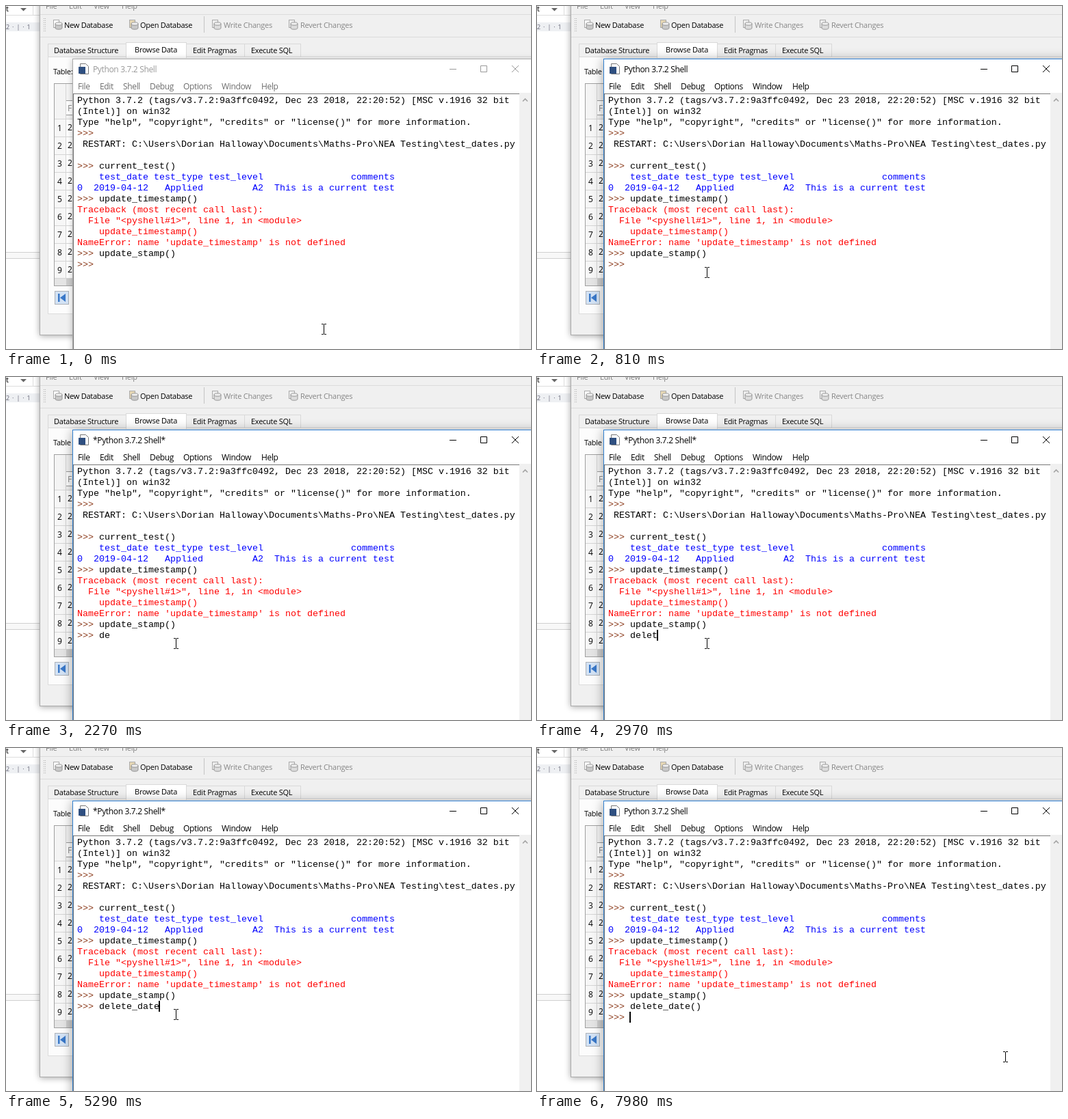
An HTML page for the animation above (8000 ms loop, 767 px wide and 502 px high).

```html
<!DOCTYPE html>
<html lang="en">
<head>
<meta charset="utf-8">
<title>Shell over database browser</title>
<style>
html, body { margin: 0; width: 100%; height: 100%; overflow: hidden; background: #fff; }
svg { display: block; }
text { white-space: pre; font: 11px "Open Sans", "Noto Sans", sans-serif; letter-spacing: -.25px; }
.num { font-size: 12px; }
.off { fill: #868686; }
#code text { font: 13.333px "Liberation Mono", monospace; letter-spacing: 0; }
#shell text.ui { font-size: 12px; letter-spacing: -.35px; }
#frame { fill: #fff; stroke: #aaa; filter: drop-shadow(0 1px 4px rgba(0,0,0,.25)); }
.active #frame { stroke: #2f7fd0; filter: drop-shadow(0 2px 8px rgba(0,0,0,.38)); }
#title, #buttons { fill: #999; stroke: none; }
#buttons { fill: none; stroke: #999; }
#menu { fill: #6d6d6d; }
.active #title, .active #menu { fill: #000; }
.active #buttons { stroke: #000; }
</style>
</head>
<body>
<svg width="767" height="502" viewBox="0 0 767 502">
  <!-- document editor -->
  <rect width="767" height="502" fill="#fff"/>
  <text x="0" y="8">t</text>
  <path d="M21 3h9l-4.5 4.5z" fill="#666"/>
  <path d="M39.5 0v13M0 13.5h50" stroke="#ddd"/>
  <rect y="24" width="50" height="13" fill="#eef0f3"/>
  <text x="0" y="34" fill="#667" style="font-size:9px">2  ·  |  ·  1</text>
  <rect y="360" width="50" height="10" fill="#f8f8f8"/>
  <path d="M0 360.5h50M0 369.5h50" stroke="#d0d0d0"/>

  <!-- database window -->
  <rect x="49.5" y="-20.5" width="760" height="502" fill="#f0f0f0" stroke="#aaa"
    style="filter:drop-shadow(0 1px 5px rgba(0,0,0,.35))"/>
  <g id="db"></g>

  <!-- shell window -->
  <g id="shell">
    <rect id="frame" x="97.5" y="77.5" width="720" height="480"/>
    <path d="M108.5 84.5h8l4 4v11h-12z" fill="#fff" stroke="#777"/>
    <rect x="106" y="89" width="10" height="10" fill="#2f4f80"/>
    <text id="title" class="ui" x="127" y="97"></text>
    <path id="buttons" d="M648 92.5h10M693.5 87.5h9v9h-9zM739 87l10 10M749 87l-10 10"/>
    <g id="menu"></g>
    <path d="M98 128.5h652M98.5 128v374" stroke="#777" fill="none"/>
    <rect x="750" y="127" width="17" height="375" fill="#f0f0f0"/>
    <path d="M755 139.5l3.5-3.5l3.5 3.5" fill="none" stroke="#a3a3a3" stroke-width="1.6"/>
    <g id="code"></g>
    <rect id="caret" width="2" height="16"/>
  </g>
  <path id="mouse" d="M-3-7.5h3M1-7.5h3M.5-7v14M-3 7.5h3M1 7.5h3" stroke="#000" fill="none"/>
</svg>
<script>
const $ = id => document.getElementById(id);
const esc = s => s.replace(/</g, "&lt;").replace(/>/g, "&gt;");
const label = (x, y, s, attrs = "") => `<text x="${x}" y="${y}" ${attrs}>${esc(s)}</text>`;
const box = (x, y, w, h, fill, line) =>
  `<rect x="${x + .5}" y="${y + .5}" width="${w}" height="${h}" fill="${fill}" stroke="${line}"/>`;
const line = (d, c) => `<path d="${d}" stroke="${c}" fill="none"/>`;

// page with a small drum in front of it
const icon = (x, page, drum) => box(x, 20, 8, 11, page, "#aaa") +
  `<path d="M${x + 3} 26v6a5 2.2 0 0 0 10 0v-6z" fill="${drum}" stroke="#777" stroke-width=".7"/>
   <ellipse cx="${x + 8}" cy="26" rx="5" ry="2.2" fill="#eee" stroke="#777" stroke-width=".7"/>`;

function drawDatabase() {
  let s = [[58, "File"], [92, "Edit"], [128, "View"], [169, "Help"]]
    .map(([x, t]) => label(x, 4, t, 'fill="#808080"')).join("");
  s += line("M50 12.5h717M50 45.5h717", "#dcdcdc") + line("M289.5 15v24", "#c4c4c4");
  s += `<path d="M55.5 18v20M57.5 18v20" stroke="#b0b0b0" stroke-dasharray="1 2"/>`;
  s += icon(69, "#fff", "#c9c9c9") + icon(180, "#e8d9b5", "#c9c9c9") +
    icon(301, "#eee", "#ddd") + icon(413, "#eee", "#ddd");
  s += label(85, 32, "New Database") + label(196, 32, "Open Database") +
    label(318, 32, "Write Changes", 'class="off"') + label(430, 32, "Revert Changes", 'class="off"');

  s += box(61, 74, 740, 376, "#fcfcfc", "#dcdcdc");
  for (const [x, w, t] of [[61, 114, "Database Structure"], [263, 85, "Edit Pragmas"], [348, 82, "Execute SQL"]])
    s += box(x, 55, w, 19, "#f0f0f0", "#d9d9d9") + label(x + (x > 61 ? 10 : 9), 69, t);
  s += box(175, 53, 88, 22, "#fff", "#d9d9d9") +
    `<rect x="176" y="74" width="87" height="3" fill="#fcfcfc"/>` + label(188, 68, "Browse Data");

  s += label(69, 100, "Table:", 'id="table"');
  s += box(70, 113, 60, 296, "#fff", "#a0a0a0") +
    `<rect x="71" y="114" width="16" height="285" fill="#f7f7f7"/>
     <rect x="71" y="114" width="40" height="51" fill="#f4f4f4"/>
     <rect x="71" y="399" width="40" height="10" fill="#e4e4e4"/>
     <rect x="88" y="399" width="20" height="10" fill="#cdcdcd"/>`;
  s += box(87, 138, 30, 21, "#fff", "#999") + label(90, 154, "F", 'class="num" fill="#888"');
  for (let i = 0; i < 9; i++) {
    const y = 165 + 26 * i;
    s += line(`M71 ${y}.5h30`, "#d5d5d5") +
      label(75, y + 18, String(i + 1), 'class="num"') + label(90, y + 17, "2", 'class="num"');
  }
  s += line("M71 398.5h30M87.5 114v285", "#d5d5d5");
  s += box(71, 417, 20, 19, "#d3e2f4", "#adb2b8") +
    `<path d="M76 421h2.5v12h-2.5zM87 421v12l-8-6z" fill="#3a78c8"/>`;
  $("db").innerHTML = s;
}

const rows = [
  'Python 3.7.2 (tags/v3.7.2:9a3ffc0492, Dec 23 2018, 22:20:52) [MSC v.1916 32 bit',
  '(Intel)] on win32',
  'Type "help", "copyright", "credits" or "license()" for more information.',
  '>>> ',
  ' RESTART: C:\\Users\\Dorian Halloway\\Documents\\Maths-Pro\\NEA Testing\\test_dates.py',
  '',
  '>>> current_test()',
  '    test_date test_type test_level                comments',
  '0  2019-04-12   Applied         A2  This is a current test',
  '>>> update_timestamp()',
  'Traceback (most recent call last):',
  '  File "<pyshell#1>", line 1, in <module>',
  '    update_timestamp()',
  "NameError: name 'update_timestamp' is not defined",
  '>>> update_stamp()',
  '>>> '
];
const PROMPT = 'fill="#8b3a1a"';

function drawShell() {
  $("menu").innerHTML = [[105, "File"], [137, "Edit"], [171, "Shell"], [210, "Debug"],
    [259, "Options"], [315, "Window"], [373, "Help"]]
    .map(([x, t]) => label(x, 122, t, 'class="ui"')).join("");
  $("code").innerHTML = rows.map((t, i) => {
    const y = 142 + 16 * i;
    if (t.startsWith(">>>")) return label(104, y, ">>>", PROMPT) + label(136, y, t.slice(4));
    const color = i > 9 ? "#f00" : i > 6 ? "#00f" : "#000";
    return label(104, y, t, `fill="${color}"`);
  }).join("") + label(136, 382, "", 'id="typed"') + label(104, 398, ">>>", PROMPT + ' id="next"');
}

const WORD = "delete_date()";
// [time, number of letters]
const keys = [[1800, 1], [1970, 2], [2680, 3], [2830, 4], [2970, 5], [3350, 6], [3520, 7], [3900, 6],
  [4200, 7], [4520, 8], [4820, 9], [5130, 10], [5290, 11], [5990, 12], [6110, 13]];
// caret toggles: shown, hidden, shown ...
const blinks = [890, 1420, 1650, 2270, 2590, 3200, 3480, 4070, 4370, 4990, 5290, 5840, 6220, 6830, 7060, 7670, 7980];
const ENTER = 6600, DONE = 7140;

// stepped progress, as a sampled pointer moves
const steps = (t, start, gap, n) =>
  Math.max(0, Math.min(1, (Math.floor((t - start) / gap) + 1) / n));
const ease = p => (1 - Math.cos(Math.PI * p)) / 2;
const mix = (a, b, p) => a.map((v, i) => Math.round(v + (b[i] - v) * p));

const REST = [248, 390];
function pointer(t) {
  if (t < 70) return [464, 473];
  if (t < 7520) return mix([424, 448], REST, ease(steps(t, 350, 71, 7)));
  return mix(REST, [684, 452], ease(steps(t, 7520, 110, 4)));
}

function draw(t) {
  const active = t >= 810;
  $("shell").setAttribute("class", active ? "active" : "");
  $("table").textContent = active ? "Table" : "Table:";
  $("title").textContent = t >= 1800 && t < DONE ? "*Python 3.7.2 Shell*" : "Python 3.7.2 Shell";

  const count = keys.reduce((n, [at, len]) => t >= at ? len : n, 0);
  $("typed").textContent = WORD.slice(0, count);
  $("typed").setAttribute("fill", count === 3 ? "#ff7700" : "#000");
  $("next").style.display = t >= DONE ? "" : "none";

  const col = t < ENTER ? 4 + count : t < DONE ? 0 : 4;
  const caret = $("caret");
  caret.setAttribute("x", 103 + 8 * col);
  caret.setAttribute("y", t < ENTER ? 370 : 386);
  caret.style.display = blinks.filter(at => t >= at).length % 2 ? "" : "none";

  $("mouse").setAttribute("transform", `translate(${pointer(t)})`);
}

drawDatabase();
drawShell();
const start = performance.now();
function tick() {
  draw((performance.now() - start) % 8000);
  requestAnimationFrame(tick);
}
tick();
</script>
</body>
</html>
```
